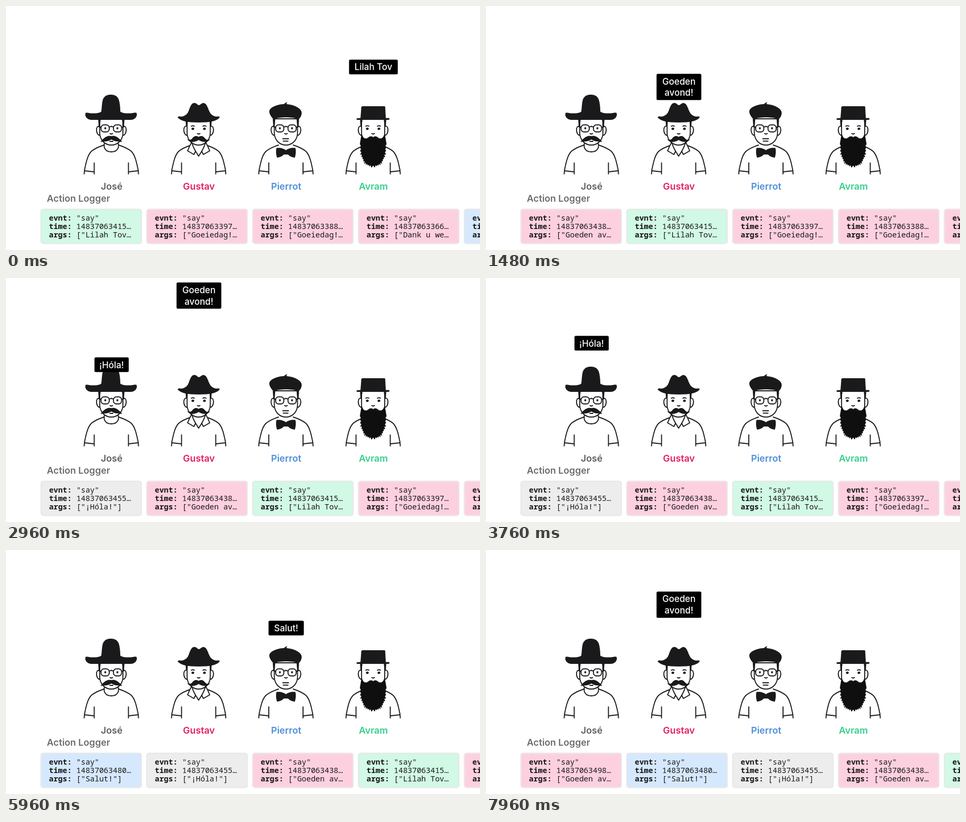
These frames come from a looping animation (900x465 px, 8000 ms). An HTML page:

```html
<!DOCTYPE html>
<html lang="en">
<head>
<meta charset="utf-8">
<title>Action Logger</title>
<style>
  html, body { margin: 0; width: 100%; height: 100%; overflow: hidden; background: #fff; }
  svg { display: block; width: 100%; height: 100%; }
  .label { font: 600 17.7px Inter, sans-serif; }
  .bubble text { font: 500 16.9px Inter, sans-serif; fill: #fff; }
  .name, .bubble text { text-anchor: middle; }
  .card text { font: 14.46px "Noto Sans Mono", monospace; fill: #161616; }
  .card .key { font-weight: 700; }
  .line { fill: none; stroke: #1c1c1e; stroke-width: 1.9; stroke-linecap: round; stroke-linejoin: round; }
  .line.skin { fill: #fff; }
  .ink { fill: #1a191b; }
  .ink.dark { fill: #100f0f; }
</style>
</head>
<body>
<svg id="stage" viewBox="0 0 900 465">
  <g id="people"></g>
  <text class="label" x="77.5" y="372.5" fill="#6c6c6c">Action Logger</text>
  <g id="cards"></g>
  <g id="bubbles"></g>
</svg>
<script>
const LOOP = 8000;
const CARD = { x: 65.5, y: 420, width: 192.5, height: 67, gap: 8.5, pad: 16, char: 8.68 };

const SPEAKERS = {
  jose:    { name: 'José',    x: 200.5, color: '#5e5e5e', tint: 'rgba(0,0,0,.07)' },
  gustav:  { name: 'Gustav',  x: 366.3, color: '#e31c5f', tint: 'rgba(245,20,100,.2)' },
  pierrot: { name: 'Pierrot', x: 532,   color: '#4a8fdc', tint: 'rgba(50,140,245,.2)' },
  avram:   { name: 'Avram',   x: 697.6, color: '#36d08a', tint: 'rgba(30,220,130,.2)' },
};

// Oldest first; width is that of the speech bubble.
const EVENTS = [
  { at: -7900, who: 'pierrot', stamp: 1483706335120, lines: ['Salut!'], width: 67 },
  { at: -6175, who: 'gustav', stamp: 1483706336612, lines: ['Dank u wel!'], width: 111 },
  { at: -3975, who: 'gustav', stamp: 1483706338814, lines: ['Goeiedag!'], width: 100 },
  { at: -3075, who: 'gustav', stamp: 1483706339716, lines: ['Goeiedag!'], width: 100 },
  { at: -1275, who: 'avram', stamp: 1483706341518, lines: ['Lilah Tov'], width: 92.5 },
  { at: 918, who: 'gustav', stamp: 1483706343852, lines: ['Goeden', 'avond!'], width: 85 },
  { at: 2572, who: 'jose', stamp: 1483706345541, lines: ['¡Hóla!'], width: 65 },
  { at: 5035, who: 'pierrot', stamp: 1483706348065, lines: ['Salut!'], width: 67 },
  { at: 6675, who: 'gustav', stamp: 1483706349839, lines: ['Goeden', 'avond!'], width: 85 },
];

// Keyframes as [age in ms, value].
const CARD_SCALE = [[0, 0], [82, .97], [125, 1.17], [140, 1.2], [165, 1.145], [300, .98], [400, 1]];
const CARD_STRETCH = [[0, 0], [82, .971], [125, 1.024], [165, 1.122], [260, 1.03], [360, 1]];
const BUBBLE_SCALE = [[0, 0], [50, 1], [82, 1.12], [125, 1.087], [165, 1.097], [340, 1]];
const BUBBLE_RISE = [[750, 0], [3000, 210]];
const BUBBLE_ALPHA = [[2030, 1], [2755, 0]];

function track(keys, age) {
  if (age <= keys[0][0]) return keys[0][1];
  for (let i = 1; i < keys.length; i++) {
    const [t0, v0] = keys[i - 1], [t1, v1] = keys[i];
    if (age < t1) return v0 + (v1 - v0) * (age - t0) / (t1 - t0);
  }
  return keys[keys.length - 1][1];
}

// Portraits, drawn around x = 0.
const line = d => `<path class="line" d="${d}"/>`;
const skin = d => `<path class="line skin" d="${d}"/>`;
const ink = (d, tone = '') => `<path class="ink ${tone}" d="${d}"/>`;
const mirror = markup => markup + `<g transform="scale(-1 1)">${markup}</g>`;

const body = mirror(line('M-14 265C-23 268-32 272-38 277C-45 284-48 298-51 313L-51.5 320M-51 314L-33 316M-32.5 299V320'));
const ears = mirror(skin('M-22 230C-28 226-30 237-26 244Q-24 247-21 246'));
const face = skin('M-22 215V243C-21 257-11 265 0 265S21 257 22 243V215Z');
const hair = mirror(ink('M-25 215H-20L-22 230H-24Z'));
const eyes = mirror('<ellipse class="ink" cx="-11" cy="234" rx="2.6" ry="2.3"/>');
const pupils = mirror('<circle class="ink" cx="-11.5" cy="233" r="1.9"/>');
const brows = mirror(line('M-14 229Q-11 227.5-8 229'));
const nose = line('M-2.5 243Q0 245 2.5 243');
const glasses = pupils + mirror('<rect class="line" x="-19.5" y="226.5" width="15.5" height="13.5" rx="5.5"/>' +
  line('M-20 231L-24 230M-4 231Q-2 229.5 0 229.5'));
const crewNeck = skin('M-13.5 262V269Q-11 278 0 278T13.5 269V262');
const collar = mirror(skin('M-13 259Q-18 268-21 276L-9 283L-6 277M-13 260C-10 272-4 280 0 286'));
const bowTie = mirror(ink('M.5 275Q-8 269-18 270.5Q-20 279-17 289Q-8 288-4 283H.5Z'));

function beard() {
  const teeth = 46, points = [];
  for (let i = 0; i <= teeth; i++) {
    const angle = Math.PI * i / teeth;
    const reach = i % 2 ? .94 : 1.02 + .03 * Math.sin(i * 2.4);
    const x = 25 * reach * Math.sign(Math.cos(angle)) * Math.abs(Math.cos(angle)) ** .8;
    points.push(`${x.toFixed(1)} ${(263 + 43.5 * reach * Math.sin(angle) ** .9).toFixed(1)}`);
  }
  return ink(`M22 243L${points.join('L')}L-22 243C-18 256-12 253-7 249Q-3 247 0 250Q3 247 7 249C12 253 18 256 22 243Z`, 'dark');
}

const portraits = {
  jose: body + crewNeck + ears + face + hair + glasses + nose + line('M-3 258H3') +
    mirror(ink('M.5 248C-6 246-13 249-20.5 259C-14 258-6 259 .5 254Z')) +
    ink('M-49 204C-51 209-47 217-37 217H36C46 217 50 209 48 204C46 202 42 204 36 204.5C28 205 20 204 17 201C17 192 16 184 14 178C11 171 6 169-1 169S-13 171-16 178C-18 184-18 192-19 201C-22 204-30 205-38 204.5C-44 204-47 202-49 204Z'),
  gustav: body + ears + face + collar + hair + eyes + brows + nose +
    mirror(ink('M.5 250C-4 246-9 248-12 252C-14 255-17 256-21.5 254C-18 260-8 261 .5 255Z')) +
    ink('M-40 212C-38 209-33 212-29 210C-24 208-21 205-19 200C-16 192-14 185-9 185C-5 184-3 188 0 189C4 189 6 184 10 185C15 186 17 193 20 200C22 205 25 208 30 210C34 212 39 209 40 212C36 219 22 222 0 222S-35 219-40 212Z'),
  pierrot: body + ears + face + hair + glasses + nose + line('M-6 253H5M-5 257.5H4') + bowTie +
    ink('M-31.5 200C-30 192-14 187-4 187L2 182.5L1 187C16 188 29 195 30 203C30 209 27 214 24 215.5C12 211-12 211-24 215.5C-29 210-32 205-31.5 200Z'),
  avram: body + ears + face + hair + eyes + brows + nose + beard() +
    ink('M-22.5 193Q-22 191-20 191H21Q23 191 23 193L24 213.5H30Q33 217 28 217H-29Q-33 217-31 214L-24 213.5Z'),
};

const byId = id => document.getElementById(id);
byId('people').innerHTML = Object.entries(SPEAKERS).map(([id, s]) =>
  `<g transform="translate(${s.x - .5} 0)">${portraits[id]}</g>` +
  `<text class="label name" x="${s.x}" y="350.3" fill="${s.color}">${s.name}</text>`).join('');

function addGroup(parent, className, markup) {
  const group = document.createElementNS(byId('stage').namespaceURI, 'g');
  group.setAttribute('class', className);
  group.innerHTML = markup;
  byId(parent).append(group);
  return group;
}

for (const event of EVENTS) {
  const speaker = SPEAKERS[event.who];
  const rows = [['evnt:', '"say"'], ['time:', String(event.stamp)], ['args:', `["${event.lines.join(' ')}"]`]];
  event.values = rows.map(row => row[1]);
  event.card = addGroup('cards', 'card',
    `<rect y="${-CARD.height / 2}" height="${CARD.height}" rx="5" fill="${speaker.tint}"/>` +
    `<rect y="${1 - CARD.height / 2}" x="1" height="${CARD.height - 2}" rx="4" fill="none" stroke="#e8e8e8" stroke-width="2"/>` +
    rows.map(([key], i) => {
      const y = i * 16 - 10.8;
      return `<text class="key" x="${CARD.pad}" y="${y}">${key}</text>` +
        `<text class="value" x="${CARD.pad + 6 * CARD.char}" y="${y}"></text>`;
    }).join(''));
  [event.fill, event.border] = event.card.querySelectorAll('rect');
  event.texts = event.card.querySelectorAll('.value');

  const count = event.lines.length;
  event.height = 6 + 22 * count;
  event.bubble = addGroup('bubbles', 'bubble',
    `<rect x="${-event.width / 2}" y="${-event.height / 2}" width="${event.width}" height="${event.height}" rx="2.5"/>` +
    event.lines.map((text, i) => `<text y="${(i - (count - 1) / 2) * 22 + 6.2}">${text}</text>`).join(''));
}

function placeCard(event, x, age) {
  const width = CARD.width * track(CARD_STRETCH, age);
  const scale = track(CARD_SCALE, age);
  const room = Math.max(0, Math.floor((width - 2 * CARD.pad) / CARD.char) - 6);
  event.card.setAttribute('transform',
    `translate(${x + width / 2} ${CARD.y}) scale(${scale}) translate(${-width / 2} 0)`);
  event.fill.setAttribute('width', width);
  event.border.setAttribute('width', Math.max(0, width - 2));
  event.texts.forEach((node, i) => {
    const value = event.values[i];
    node.textContent = value.length <= room ? value : room ? value.slice(0, room - 1) + '…' : '';
  });
  return x + width + CARD.gap * Math.min(1, width / CARD.width);
}

function placeBubble(event, age) {
  const y = 179.3 - event.height / 2 - track(BUBBLE_RISE, age);
  event.bubble.setAttribute('transform',
    `translate(${SPEAKERS[event.who].x} ${y}) scale(${track(BUBBLE_SCALE, age)})`);
  event.bubble.setAttribute('opacity', track(BUBBLE_ALPHA, age));
}

function draw(time) {
  let x = CARD.x;
  for (const event of [...EVENTS].reverse()) {
    const age = time - event.at;
    const started = age >= 0;
    event.card.style.display = started && x < 900 ? '' : 'none';
    event.bubble.style.display = started && age < 2755 ? '' : 'none';
    if (!started) continue;
    x = placeCard(event, x, age);
    placeBubble(event, age);
  }
}

const start = performance.now();
function tick() {
  draw((performance.now() - start) % LOOP);
  requestAnimationFrame(tick);
}
tick();
</script>
</body>
</html>
```
